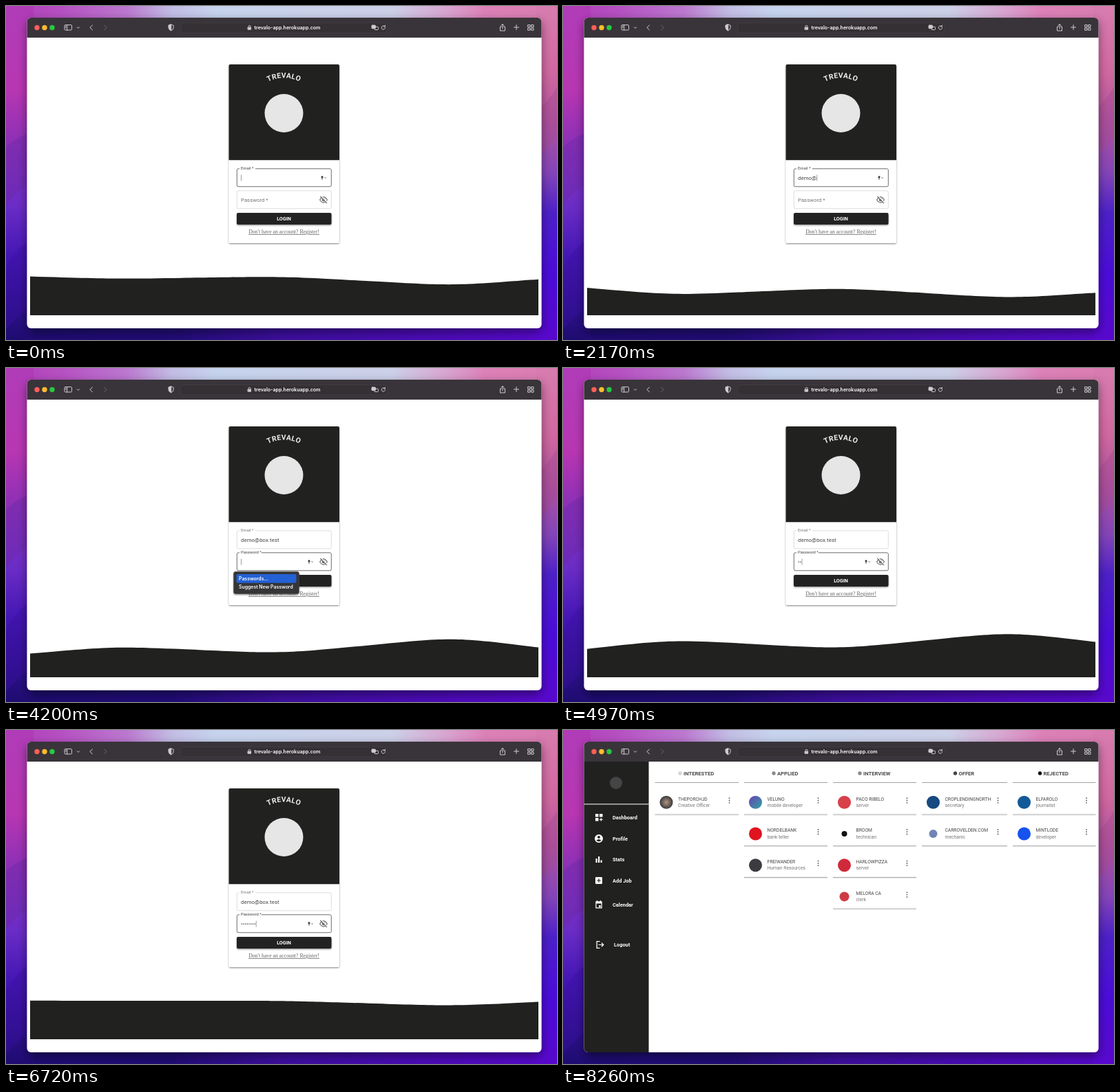
An HTML page for the animation above (8.33 s loop, 800 px wide and 486 px high).

```html
<!DOCTYPE html>
<html lang="en">
<head>
<meta charset="utf-8">
<title>Job board login</title>
<style>
html, body { margin: 0; width: 100%; height: 100%; overflow: hidden; background: #5a1fc4; }
svg { display: block; width: 800px; height: 486px; }
text { font-family: Roboto, Arial, sans-serif; white-space: pre; }
.ui { font-family: Inter, "Open Sans", sans-serif; font-weight: 600; fill: #fff; }
.line { fill: none; stroke: #cfcbd0; stroke-width: 1; stroke-linecap: round; stroke-linejoin: round; }
.link { font-family: "Liberation Serif", "Times New Roman", serif; font-size: 7.78px; fill: #666; text-decoration: underline; }
.nav { font-size: 7.4px; font-weight: 700; fill: #fff; }
.head { font-size: 7.6px; font-weight: 600; fill: #4a4a4a; }
.firm { font-size: 6.7px; fill: #444; }
.role { font-size: 6.8px; fill: #777; }
.value { font-size: 7.8px; letter-spacing: .07px; fill: #444; }
</style>
</head>
<body>
<svg viewBox="0 0 800 486" xmlns="http://www.w3.org/2000/svg">
  <defs>
    <linearGradient id="top">
      <stop offset="0" stop-color="#b03cb8"/><stop offset=".1" stop-color="#b650c2"/>
      <stop offset=".22" stop-color="#bb78cf"/><stop offset=".3" stop-color="#c2bce4"/>
      <stop offset=".38" stop-color="#c6d3ed"/><stop offset=".7" stop-color="#ccd0e8"/>
      <stop offset=".8" stop-color="#d8a4d0"/><stop offset=".87" stop-color="#dc80b8"/>
      <stop offset="1" stop-color="#d87cb0"/>
    </linearGradient>
    <linearGradient id="left" x2="0" y2="1">
      <stop offset="0" stop-color="#b03cb8"/><stop offset=".25" stop-color="#b836b2"/>
      <stop offset=".4" stop-color="#8f30b6"/><stop offset=".6" stop-color="#6a2cc6"/>
      <stop offset=".75" stop-color="#4416b4"/><stop offset="1" stop-color="#1e0c70"/>
    </linearGradient>
    <linearGradient id="right" x2="0" y2="1">
      <stop offset="0" stop-color="#d87cb0"/><stop offset=".2" stop-color="#d0689f"/>
      <stop offset=".34" stop-color="#b0539f"/><stop offset=".5" stop-color="#8344b8"/>
      <stop offset=".62" stop-color="#4c20c8"/><stop offset=".8" stop-color="#4a0cd8"/>
      <stop offset="1" stop-color="#5808cc"/>
    </linearGradient>
    <linearGradient id="base">
      <stop offset="0" stop-color="#1e0c70"/><stop offset=".3" stop-color="#200c74"/>
      <stop offset=".5" stop-color="#3c0e9c"/><stop offset="1" stop-color="#5808cc"/>
    </linearGradient>
    <radialGradient id="photo"><stop offset="0" stop-color="#b09382"/><stop offset="1" stop-color="#3c3a3c"/></radialGradient>
    <linearGradient id="mix" x2="1" y2="1"><stop offset="0" stop-color="#6a3fb4"/><stop offset="1" stop-color="#2fa5a0"/></linearGradient>
    <filter id="deep" x="-10%" y="-10%" width="120%" height="125%">
      <feDropShadow dx="0" dy="5" stdDeviation="7" flood-opacity=".45"/>
    </filter>
    <filter id="soft" x="-10%" y="-10%" width="120%" height="130%">
      <feDropShadow dx="0" dy="1.2" stdDeviation="1.2" flood-opacity=".45"/>
    </filter>
    <clipPath id="win"><rect x="30.500" y="17" width="747" height="452" rx="6"/></clipPath>
    <path id="arc" d="M353.500 154.500a50 50 0 0 1 100 0"/>
    <g id="key">
      <circle cx="1.5" cy="-1.3" r="1.5" fill="#333"/><path d="M1.5 0V2.7" stroke="#333" stroke-width="1"/>
      <path d="M4.7 -.6l1.4 1.3 1.4-1.3" fill="none" stroke="#555" stroke-width=".8"/>
    </g>
  </defs>

  <g id="wallpaper">
    <rect width="800" height="60" fill="url(#top)"/>
    <rect y="440" width="800" height="46" fill="url(#base)"/>
    <rect width="40" height="486" fill="url(#left)"/>
    <rect x="770" width="30" height="486" fill="url(#right)"/>
    <path d="M0 205Q18 190 30 186V262Q12 272 0 290Z" fill="#6a2aa6" opacity=".4"/>
    <path d="M0 380Q18 350 30 345V440L0 470Z" fill="#3a10a0" opacity=".4"/>
    <path d="M800 118Q786 140 778 146V214Q792 204 800 190Z" fill="#a34a90" opacity=".4"/>
  </g>

  <rect x="30.500" y="17" width="747" height="452" rx="6" fill="#fff" filter="url(#deep)"/>
  <g clip-path="url(#win)">
    <g id="login">
      <path id="wave" fill="#212120"/>
      <g id="card">
        <rect id="sheet" x="323.500" y="85" width="160.500" height="260" rx="2" fill="#fff" filter="url(#soft)"/>
        <path d="M323.500 224.300V87a2 2 0 0 1 2-2H482a2 2 0 0 1 2 2V224.300Z" fill="#212120"/>
        <circle cx="403.500" cy="156" r="28" fill="#e6e6e6"/>
        <text font-size="10.500" font-weight="600" fill="#eee" letter-spacing=".3" text-anchor="middle"><textPath href="#arc" startOffset="50%">TREVALO</textPath></text>
        <g id="fields"></g>
        <g stroke="#666" stroke-width="1.1" fill="none">
          <path d="M455.600 282q5.400-8.200 10.800 0q-5.400 8.200-10.800 0Z"/>
          <circle cx="461" cy="282" r="1.700" fill="#666"/>
          <path d="M457.300 276.300l9.600 10.200" stroke="#fff" stroke-width="1.200"/>
          <path d="M456.200 276.900l9.800 10.300"/>
        </g>
        <rect x="335" y="301" width="137.500" height="17" rx="2" fill="#212120" filter="url(#soft)"/>
        <text x="403.500" y="312" font-size="7.200" font-weight="700" fill="#fff" text-anchor="middle">LOGIN</text>
        <text class="link" x="403.500" y="331" text-anchor="middle">Don't have an account? Register!</text>
        <rect id="caret" width=".8" height="9" fill="#888"/>
      </g>
      <g id="progress">
        <rect x="323.500" y="343.500" width="160.500" height="1.600" fill="#c4c4c4"/>
        <rect id="bar" y="343.500" height="1.600" fill="#212120"/>
      </g>
      <g id="popup">
        <rect x="330.500" y="296.200" width="95" height="32.500" rx="3" fill="#353437" stroke="#5a595c" stroke-width=".5" filter="url(#soft)"/>
        <rect x="334.500" y="300" width="87" height="12.700" rx="2" fill="#2361d6"/>
        <text class="ui" x="338" y="309" font-size="6.900">Passwords...</text>
        <text class="ui" x="338" y="321" font-size="6.900">Suggest New Password</text>
      </g>
    </g>
    <g id="board"></g>

    <rect x="30" y="17" width="748" height="29" fill="#39343a"/>
    <rect x="254" y="24.500" width="299" height="14.500" rx="3" fill="#343034" stroke="#474248" stroke-width=".6"/>
    <circle cx="45" cy="31.500" r="3.700" fill="#fe5f57"/>
    <circle cx="56" cy="31.500" r="3.700" fill="#febc2e"/>
    <circle cx="67" cy="31.500" r="3.700" fill="#28c840"/>
    <g class="line">
      <rect x="85" y="27.500" width="10.500" height="7.500" rx="1.300"/><path d="M88.700 27.500V35M86.400 29.500h.8M86.400 31.300h.8"/>
      <path d="M103.300 30.800l1.600 1.600 1.600-1.600M125.500 28l-3.700 3.400 3.700 3.400"/>
      <path d="M142.500 28l3.700 3.400-3.700 3.400" stroke="#6a656c"/>
      <path d="M239.700 27l3.500 1.300v3q0 3-3.500 4.500q-3.500-1.500-3.500-4.500v-3Z"/>
      <path d="M239.700 27v8.800q-3.500-1.500-3.500-4.500v-3Z" fill="#cfcbd0"/>
      <path d="M352 31v-1.200a1.500 1.500 0 0 1 3 0V31"/><rect x="351.400" y="31.200" width="4.200" height="3" fill="#cfcbd0"/>
      <rect x="531" y="28" width="5.500" height="4.700" rx="1" fill="#cfcbd0"/><rect x="535" y="30.300" width="5.500" height="4.300" rx="1"/>
      <path d="M550 29.800a2.700 2.700 0 1 0 .6 1.800M550.300 28v2h-2"/>
      <path d="M719.300 30H717.500v6h7V30h-1.800M721 33V26.500M719 28.300l2-1.900 2 1.900M741 27.500v7M737.500 31h7"/>
      <path d="M758 27.500h3v3h-3ZM763 27.500h3v3h-3ZM758 32.200h3v3h-3ZM763 32.200h3v3h-3Z"/>
    </g>
    <text class="ui" x="408.500" y="34.300" font-size="7.100" text-anchor="middle">trevalo-app.herokuapp.com</text>
  </g>
</svg>

<script>
const LOOP = 8330, STEP = 70;
const FOCUS = 3850, LOADING = 7300, BOARD = 7910;
const EMAIL = 'demo@box.test';
const emailKeys = [630, 840, 1120, 1330, 1960, 2310, 2450, 2590, 2730, 2870, 3010, 3150, 3290];
const passKeys = [4760, 4970, 5180, 5390, 5600, 5810, 6090, 6300];
const $ = id => document.getElementById(id);
const set = (el, attrs) => { for (const k in attrs) el.setAttribute(k, attrs[k]); };
const show = (el, on) => el.setAttribute('display', on ? 'inline' : 'none');

// Login fields
const field = (id, y, label, gap) => `
  <rect id="${id}Box" x="335.3" y="${y}" width="137" height="26" rx="2" fill="none"/>
  <rect id="${id}Gap" x="339" y="${y - 1}" width="${gap}" height="2" fill="#fff"/>
  <text id="${id}Label" x="341">${label} *</text>
  <text id="${id}Text" class="value" x="341" y="${y + 15.7}"></text>`;
$('fields').innerHTML = field('email', 236.8, 'Email', 23) + field('pass', 268.8, 'Password', 32) +
  '<use id="keyIcon" href="#key"/>';

// Job board
const text = (cls, x, y, str) => `<text class="${cls}" x="${x}" y="${y}">${str}</text>`;
const columns = [
  { title: 'INTERESTED', x: 133.5, w: 121.5, dot: 170, shade: '#d5d5d5', jobs: [['THEPORCHJD', 'Creative Officer', 'url(#photo)']] },
  { title: 'APPLIED', x: 263, w: 121, dot: 306, shade: '#8a8a8a', jobs: [
    ['VELUNO', 'mobile developer', 'url(#mix)'], ['NORDELBANK', 'bank teller', '#e0141e'], ['FREIWANDER', 'Human Resources', '#3c3c40']] },
  { title: 'INTERVIEW', x: 392, w: 121, dot: 431, shade: '#8a8a8a', jobs: [
    ['PACO RIBELO', 'server', '#d8404a'], ['BROOM', 'technican', '#111', 4], ['HARLOWPIZZA', 'server', '#d02a3a'], ['MELORA CA', 'clerk', '#cf3b44', 7]] },
  { title: 'OFFER', x: 521, w: 124, dot: 569.5, shade: '#444', jobs: [
    ['CROPLENDINGNORTH', 'secretary', '#164a80'], ['CARROVELDEN.COM', 'mechanic', '#7084b4', 6]] },
  { title: 'REJECTED', x: 653, w: 120.5, dot: 692.5, shade: '#111', jobs: [
    ['ELFAROLO', 'journalist', '#135a98'], ['MINTLODE', 'developer', '#1652f0']] }
];
const job = (col, [firm, role, fill, r = 9.5], row) => {
  const y = 105 + row * 45.7, x = col.x;
  const dots = [-3.3, 0, 3.3].map(d => `<circle cx="${x + col.w - 13.5}" cy="${y - 2.5 + d}" r=".9" fill="#555"/>`).join('');
  return `<path d="M${x} ${y + 18}h${col.w}" stroke="#a2a2a2"/><path d="M${x} ${y + 19}h${col.w}" stroke="#e4e4e4"/>
    <circle cx="${x + 16.5}" cy="${y + .3}" r="${r}" fill="${fill}"/>` +
    text('firm', x + 33.5, y - 2.4, firm) + text('role', x + 33.5, y + 7, role) + dots;
};
const navItems = [
  ['Dashboard', 127, 'M47 122h4.500v4.500H47ZM53 122h4.500v4.500H53ZM47 128h4.500v4.500H47ZM54.700 128h1.200v1.700h1.700v1.200h-1.700v1.700h-1.200v-1.700H53v-1.200h1.700Z'],
  ['Profile', 158, 'M52 152a6 6 0 1 0 0 12a6 6 0 0 0 0-12ZM52 154a1.900 1.900 0 1 1 0 3.800a1.900 1.900 0 0 1 0-3.800ZM48.300 160.500q3.700-3 7.400 0q-3.700 3.500-7.400 0Z'],
  ['Stats', 188.5, 'M47.500 187h2.200v6h-2.200ZM51 184h2.200v9H51ZM54.500 189.500h2.200v3.500h-2.200Z'],
  ['Add Job', 219, 'M48 214h8q1 0 1 1v8q0 1-1 1h-8q-1 0-1-1v-8q0-1 1-1ZM51.400 216.200v2.200h-2.200v1.200h2.200v2.200h1.200v-2.200h2.200v-1.200h-2.200v-2.200Z'],
  ['Calendar', 254, 'M47.300 249.300h1.700v-1.300h1.200v1.300h3.600v-1.300h1.200v1.300h1.700v10.200h-9.400ZM48.500 252.500v5.800h7v-5.800ZM52 255h2.700v2.700H52Z'],
  ['Logout', 312, 'M48.500 307h5v1.300h-3.700v8.400h3.700v1.300h-5ZM51.500 311.900h5.700l-1.700-1.700.9-.9 3.200 3.200-3.200 3.200-.9-.9 1.700-1.700h-5.700Z']
];
$('board').innerHTML = `<rect x="30" y="46" width="94.5" height="423" fill="#212120"/>
  <circle cx="77" cy="77" r="9" fill="#454545"/>
  <path d="M30 107.800h94.5" stroke="#d8d8d8" stroke-width="1.300"/>` +
  navItems.map(([label, y, d]) => `<path d="${d}" fill="#fff" fill-rule="evenodd"/>` +
    text('nav', label === 'Logout' ? 74 : 72, y + 2.7, label)).join('') +
  columns.map(c => `<circle cx="${c.dot}" cy="63" r="2.700" fill="${c.shade}"/>` +
    text('head', c.dot + 5, 65.7, c.title) +
    `<path d="M${c.x} 76.500h${c.w}" stroke="#a2a2a2"/>` +
    c.jobs.map((j, i) => job(c, j, i)).join('')).join('');

// Four points bob on a squared sine and are joined by one smooth curve.
function wavePath(t) {
  const phase = t / 1000 * Math.PI / 7;
  const pts = [0, .28, .56, .43].map((lag, i) => [35 + 246 * i, 393.4 + 24.4 * Math.sin(phase + lag) ** 2]);
  let cx = (pts[0][0] + pts[1][0]) / 2, cy = 2 * pts[1][1] - pts[0][1];
  let d = `M${pts[0]}`;
  for (let i = 1; i < 4; i++) {
    const [x, y] = pts[i];
    d += `C${cx} ${cy} ${cx} ${cy} ${x} ${y}`;
    cx = 2 * x - cx;
    cy = 2 * y - cy;
  }
  return d + 'V450H35Z';
}

// lift: 0 = label rests inside the field, 1 = label sits on the border
function styleField(id, top, focused, lift) {
  set($(id + 'Box'), { stroke: focused ? '#5c5c5c' : '#cdcdcd', 'stroke-width': focused ? .9 : .7 });
  set($(id + 'Label'), { y: top + 15.7 - 14.2 * lift, 'font-size': 7.8 - 1.95 * lift, fill: focused ? '#444' : '#777' });
  show($(id + 'Gap'), lift > .5);
}

function draw(t) {
  const onBoard = t >= BOARD;
  show($('board'), onBoard);
  show($('login'), !onBoard);
  if (onBoard) return;

  $('wave').setAttribute('d', wavePath(t));
  const inPass = t >= FOCUS, loading = t >= LOADING;
  const typed = keys => keys.filter(k => k <= t);
  const mail = typed(emailKeys), pass = typed(passKeys);
  $('emailText').textContent = EMAIL.slice(0, mail.length);
  $('passText').textContent = '•'.repeat(pass.length);
  styleField('email', 236.8, !inPass, 1);
  styleField('pass', 268.8, inPass, Math.min(1, Math.max(0, (t - FOCUS) / 200)));
  $('keyIcon').setAttribute('transform', inPass ? 'translate(438.500 282)' : 'translate(457.500 250)');

  const active = $(inPass ? 'passText' : 'emailText');
  const width = active.textContent ? active.getComputedTextLength() : 0;
  const last = Math.max(0, inPass ? FOCUS : 0, ...mail, ...pass);
  set($('caret'), { x: 341.2 + width, y: inPass ? 277.5 : 245.5 });
  show($('caret'), (t - last) % 1000 < 550);
  show($('popup'), inPass && t < passKeys[0]);

  $('card').setAttribute('transform', `translate(0 ${loading ? -1 : 0})`);
  $('sheet').setAttribute('height', loading ? 261.5 : 260);
  show($('progress'), loading);
  if (loading) {
    const p = (t - LOADING) / 1323;
    const from = Math.max(0, -.35 + 1.35 * p), to = Math.min(1, 1.9 * p);
    set($('bar'), { x: 323.5 + 160.5 * from, width: 160.5 * (to - from) });
  }
}

const start = performance.now();
function tick() {
  const t = (performance.now() - start) % LOOP;
  draw(Math.floor(t / STEP) * STEP);
  requestAnimationFrame(tick);
}
tick();
</script>
</body>
</html>
```
